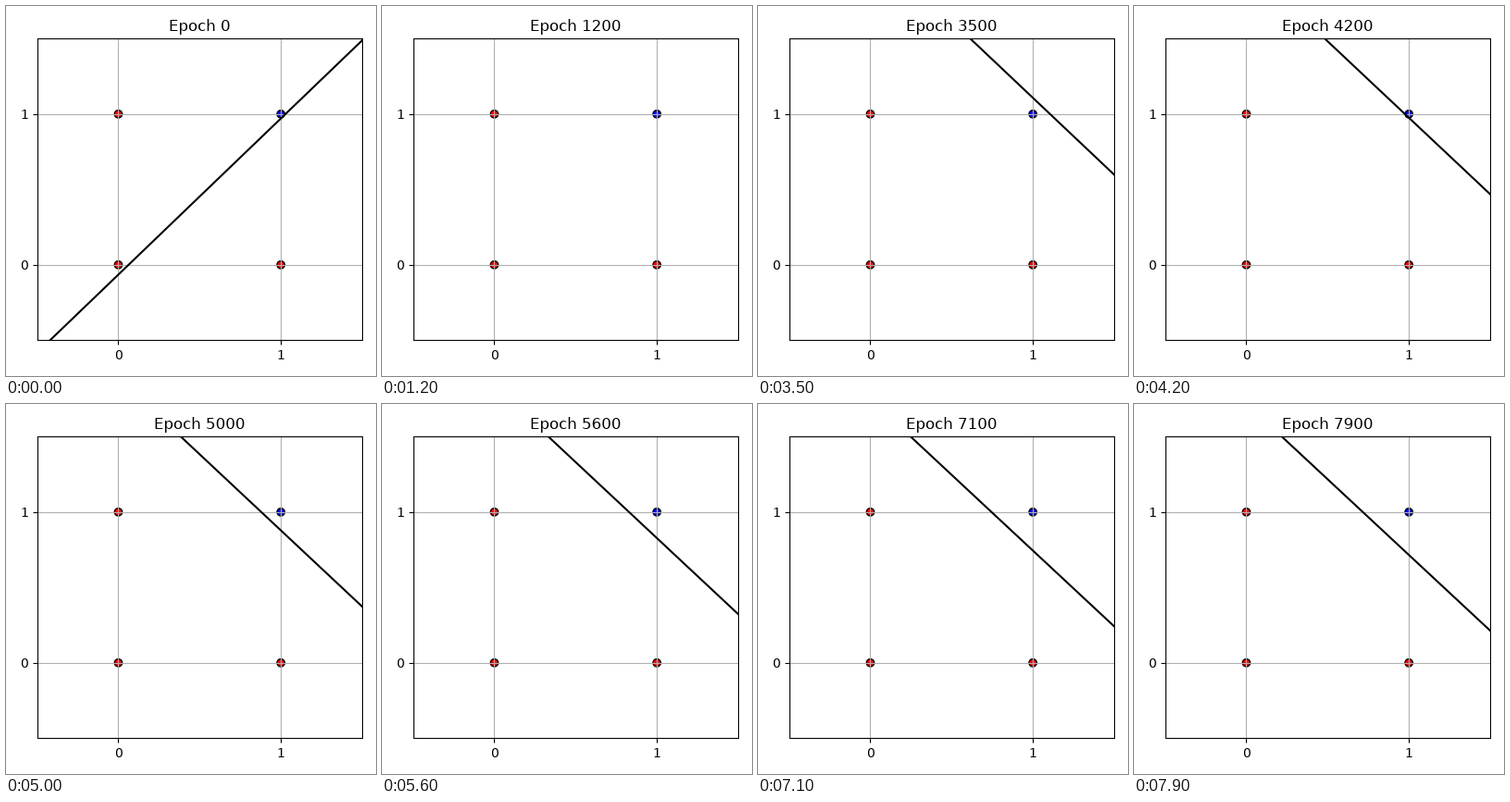
These frames come from a looping animation (400x400 px, 8000 ms). A matplotlib script:

```python
import numpy as np
import matplotlib.pyplot as plt
from matplotlib.animation import FuncAnimation

FRAMES, STRIDE, RATE = 80, 100, 0.001

X = np.array([[0, 0], [0, 1], [1, 0], [1, 1]], float)
Y = np.array([0, 0, 0, 1], float)


def train():
    """Logistic regression on AND; keep (w1, w2, b) every STRIDE epochs."""
    w, b = np.array([0.0159, -0.01535]), 0.0
    states = []
    for epoch in range((FRAMES - 1) * STRIDE + 1):
        err = Y - 1 / (1 + np.exp(-(X @ w + b)))
        w = w + RATE * (X.T @ err)
        b += RATE * err.sum()
        if epoch % STRIDE == 0:
            states.append((*w, b))
    return states


states = train()

plt.rcParams["text.hinting"] = "native"
fig, ax = plt.subplots(figsize=(4, 4), dpi=100)
ax.scatter(X[:, 0], X[:, 1], c=["b" if y else "r" for y in Y], edgecolors="k")
ax.set(xlim=(-0.5, 1.5), ylim=(-0.5, 1.5), xticks=[0, 1], yticks=[0, 1])
ax.grid(True)
xs = np.array([-0.5, 1.5])
line, = ax.plot(xs, xs, "k")
title = ax.set_title("Epoch 0")
fig.tight_layout()
fig.subplots_adjust(top=0.9117)


def update(i):
    w1, w2, b = states[i]
    line.set_data(xs, -(w1 * xs + b) / w2)
    title.set_text(f"Epoch {i * STRIDE}")
    return line, title


anim = FuncAnimation(fig, update, frames=FRAMES, interval=100,
                     repeat=True, repeat_delay=0)
plt.show()
```
